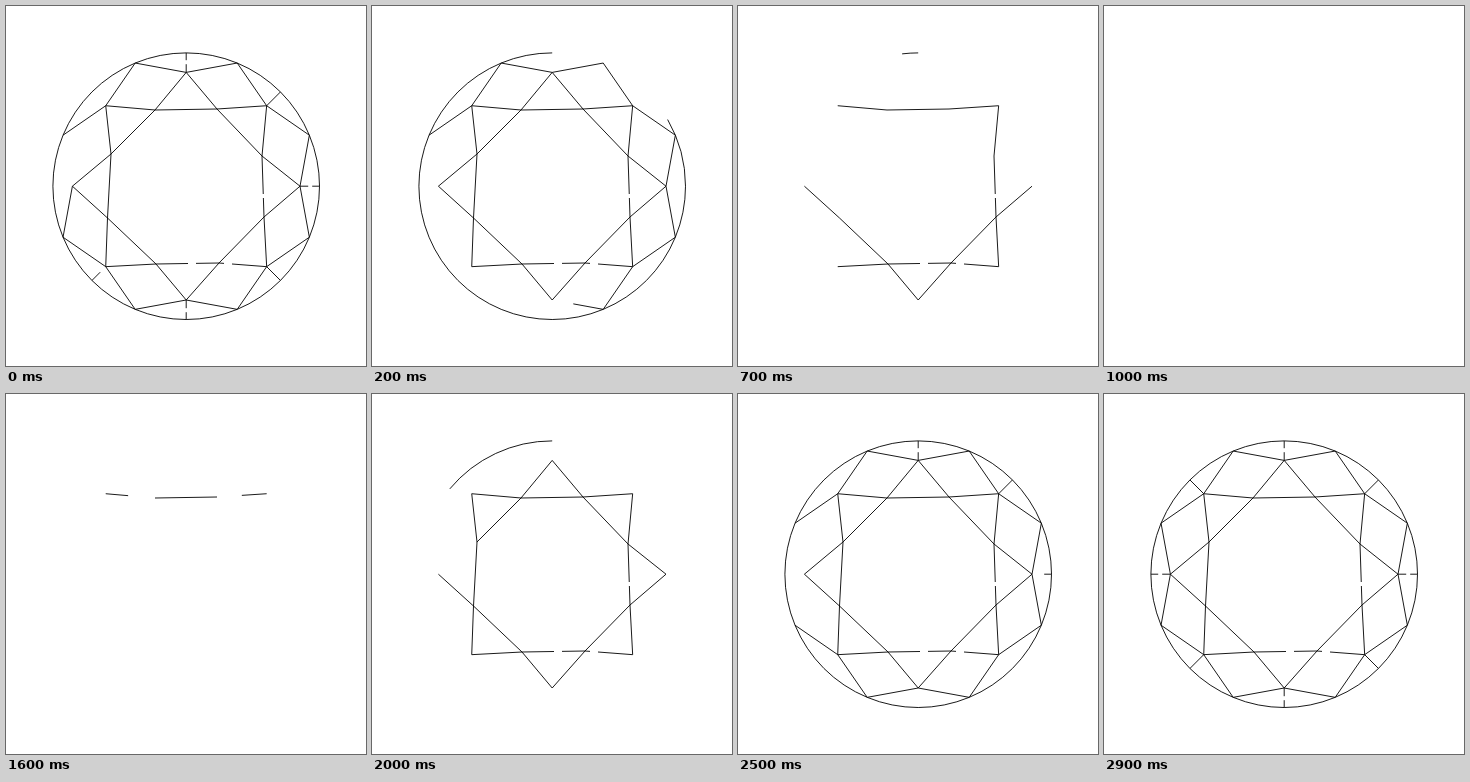
Animation, 360 px wide and 360 px high, one loop 4000 ms. Source, as an HTML page with a canvas:

```html
<!DOCTYPE html>
<html lang="en">
<head>
<meta charset="utf-8">
<title>Diamond line drawing</title>
<style>
html, body { margin: 0; width: 100%; height: 100%; overflow: hidden; background: #fff; }
canvas { display: block; width: 360px; height: 360px; }
</style>
</head>
<body>
<canvas id="stage" width="360" height="360"></canvas>
<script>
const ctx = document.getElementById('stage').getContext('2d');
const LOOP = 4000, MID = 180.2, RIM = 133.3, STAR = 113.8;

// Point at radius r, turned clockwise from the top in eighths
function polar(r, eighth) {
  const a = eighth * Math.PI / 4;
  return [MID + r * Math.sin(a), MID - r * Math.cos(a)];
}

// The cut is slightly uneven, so its eight crossings are given
const table = [
  [211, 103], [256, 150], [258, 211], [213, 257],
  [150, 258], [101.5, 212], [105, 148], [149, 104]
];
const tip = i => polar(STAR, i);
const inner = i => table[i % 8];
const facet = q => polar(q % 2 ? RIM : STAR, q / 2);
const side = c => [tip(c), inner(c), inner(c + 1), tip(c + 2)];
const facets = (a, b) => Array.from({ length: b - a + 1 }, (_, i) => facet(a + i));

const traces = [];
const trace = (pts, from, to) => traces.push({ pts, from, to });

// Top edge: middle first, then both ends inward
trace([inner(7), inner(0)], 0, 1);
trace([tip(7), inner(7)], 0.5, 1.6);
trace([tip(1), inner(0)], 0.5, 1.5);

// Remaining edges of the two squares
[1, 3, 2, 4].forEach((c, n) => trace(side(c), 1 + n / 2, 2.5 + n / 2));
trace(side(5), 4, 5);
trace(side(0), 4, 5);
trace(side(6).reverse(), 4, 5.45);

// Outer facets, clockwise from the upper left
trace(facets(13, 16), 5, 7.05);
trace(facets(0, 11), 7, 9.9);
trace(facets(11, 13), 10, 12);

// Ticks from the rim to each tip
for (let i = 0; i < 8; i++) trace([polar(RIM, i), tip(i)], 9.2 + 0.3 * i, 9.7 + 0.3 * i);

// Small breaks in the line
const breaks = [[186, 257], [222, 258], [257, 190]];
for (let i = 0; i < 8; i += 2) breaks.push(polar(124, i));

const part = (step, from, to) => Math.max(0, Math.min(1, (step - from) / (to - from)));
const dist = (a, b) => Math.hypot(b[0] - a[0], b[1] - a[1]);

function drawPart(pts, amount) {
  let left = 0;
  for (let i = 1; i < pts.length; i++) left += dist(pts[i - 1], pts[i]);
  left *= amount;
  ctx.moveTo(...pts[0]);
  for (let i = 1; i < pts.length && left > 0; i++) {
    const [x, y] = pts[i - 1], len = dist(pts[i - 1], pts[i]), f = Math.min(1, left / len);
    ctx.lineTo(x + (pts[i][0] - x) * f, y + (pts[i][1] - y) * f);
    left -= len;
  }
}

// Half of the rim, anticlockwise from angle a
function drawHalf(a, amount) {
  if (!amount) return;
  ctx.moveTo(MID + RIM * Math.cos(a), MID + RIM * Math.sin(a));
  ctx.arc(MID, MID, RIM, a, a - Math.PI * amount, true);
}

// Undraw, pause, draw, hold
function stepAt(ms) {
  const tick = Math.floor(ms / 100);
  if (tick < 10) return 11 - tick;
  if (tick < 16) return 0;
  return tick >= 29 ? 13 : Math.min(12, tick - 15);
}

function draw(step) {
  ctx.fillStyle = '#fff';
  ctx.fillRect(0, 0, 360, 360);
  ctx.strokeStyle = '#000';
  ctx.lineWidth = 0.9;
  ctx.beginPath();
  for (const { pts, from, to } of traces) {
    const amount = part(step, from, to);
    if (amount) drawPart(pts, amount);
  }
  drawHalf(-Math.PI / 2, part(step, 3.84, 8));
  drawHalf(Math.PI / 2, part(step, 7, 10));
  ctx.stroke();
  for (const [x, y] of breaks) {
    const r = y > 250 && y < 260 ? 4 : 2;
    ctx.fillRect(x - r, y - r, 2 * r, 2 * r);
  }
}

const began = performance.now();
function frame() {
  draw(stepAt((performance.now() - began) % LOOP));
  requestAnimationFrame(frame);
}
frame();
</script>
</body>
</html>
```
